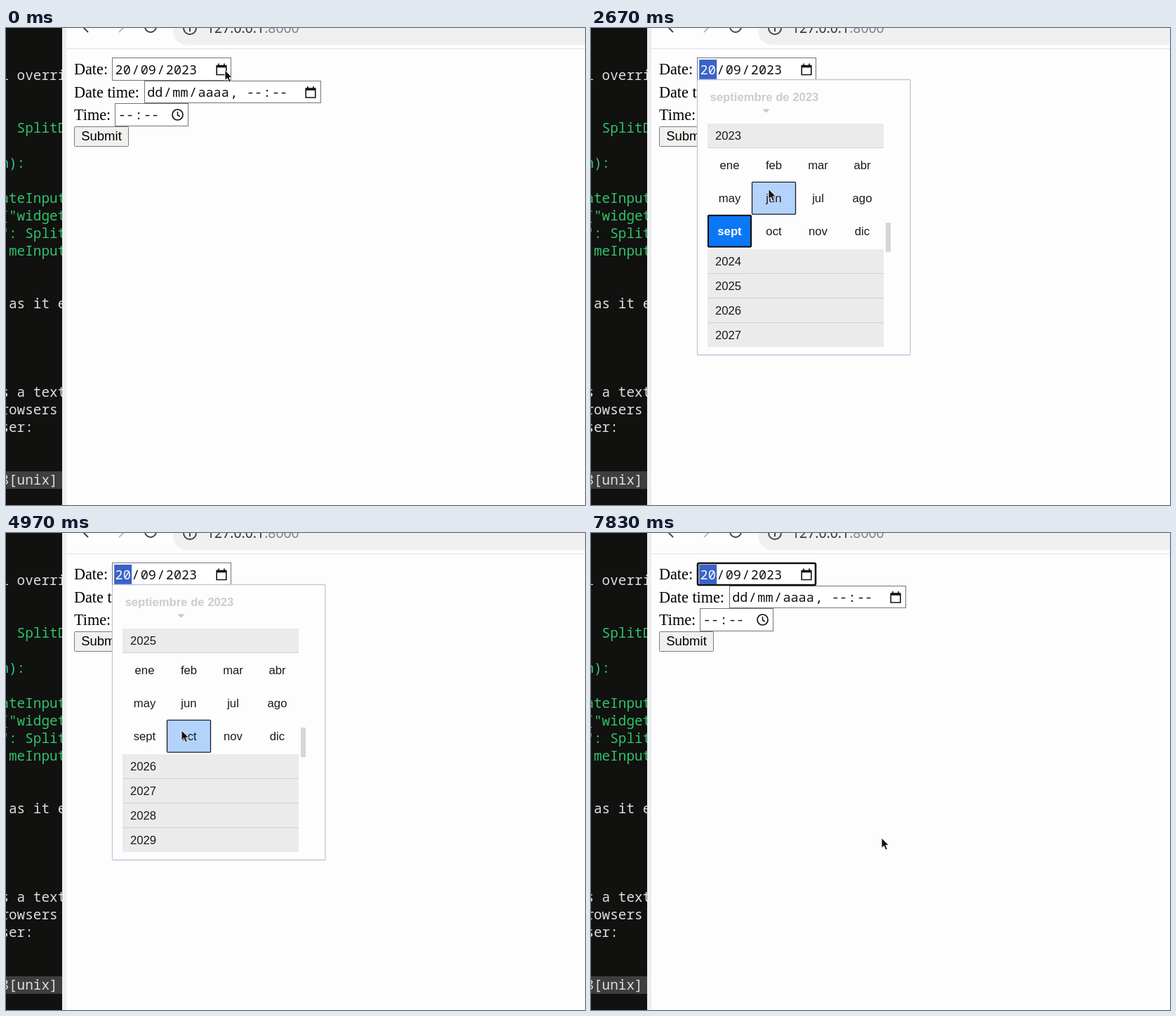
An HTML page that plays this animation: 825x679 px, repeating every 7860 ms.

```html
<!DOCTYPE html>
<html lang="es">
<head>
<meta charset="utf-8">
<title>Date picker</title>
<style>
html, body { margin: 0; width: 100%; height: 100%; overflow: hidden; background: #fdfdfd; }
svg { display: block; width: 825px; height: 679px; }
text { white-space: pre; }
.term { font: 19.35px "Noto Sans Mono", monospace; }
.field { font: 18.5px "Noto Sans Mono", monospace; fill: #111; }
.label { font: 22.2px "Liberation Serif", serif; fill: #000; }
.ui { font: 16.7px "Liberation Sans", sans-serif; fill: #1a1a1e; }
.mid { text-anchor: middle; }
.bold { font-weight: bold; }
</style>
</head>
<body>
<svg viewBox="0 0 825 679" xmlns="http://www.w3.org/2000/svg">
  <defs>
    <clipPath id="termClip"><rect width="80" height="679"/></clipPath>
    <clipPath id="listClip"><rect id="listArea" x="166" y="136" width="262" height="318"/></clipPath>
  </defs>
  <rect width="825" height="679" fill="#fdfdfd"/>
  <rect x="238" y="-22" width="700" height="46" rx="20" fill="#f0f0f3"/>
  <g fill="none" stroke="#444" stroke-width="2">
    <path d="M108-3L117 6"/>
    <path d="M161 6L170-3" stroke="#bbb"/>
    <path d="M198-2A8 8 0 0 0 214-2"/>
    <circle cx="262" cy="0" r="9"/>
    <path d="M262-2V5"/>
  </g>
  <text x="286" y="7" fill="#33333a" font-size="19.4" font-family="Noto Sans, sans-serif">127.0.0.1<tspan fill="#808088">:8000</tspan></text>
  <path d="M86 29.5H825" stroke="#e0e0ec"/>
  <rect x="80" width="6" height="679" fill="#ededf3"/>
  <rect width="80" height="679" fill="#111110"/>
  <g id="term" class="term" clip-path="url(#termClip)"></g>
  <g id="form"></g>
  <g id="popup"></g>
  <path id="cursor" d="M0 0V14.5L3.4 11.5L5.8 17.2L8.4 16.1L6 10.6H10.4Z" fill="#111" stroke="#fff" stroke-width=".9"/>
</svg>
<script>
const LOOP = 7860;
const OPEN = 480, CHOOSE = 1330, NEXT_A = 3300, NEXT_B = 4183, PICK = 5500, CLOSE = 7250;
const ROW = 35, MONTHS_H = 144.3, TOP = 136, CELL = 39.2;
const MONTHS = "ene feb mar abr may jun jul ago sept oct nov dic".split(" ");

// time, x, y
const PATH = [
  [0, 312, 60], [30, 312, 60], [230, 308, 57], [520, 308, 57], [1130, 298, 93], [1230, 292, 96],
  [1600, 292, 96], [1970, 258, 180], [2100, 258, 180], [2270, 256, 195], [2430, 256, 195],
  [2670, 253, 229], [3200, 243, 331], [3800, 243, 331], [4000, 242, 328], [4830, 242, 328],
  [4970, 250, 281], [5330, 251, 189], [5850, 251, 189], [6270, 336, 318], [6730, 414, 434], [LOOP, 414, 434]
];

const $ = id => document.getElementById(id);
const text = (s, x, y, cls, more = "") => `<text x="${x}" y="${y}" class="${cls}" ${more}>${s}</text>`;
const rect = (x, y, w, h, fill, more = "") => `<rect x="${x}" y="${y}" width="${w}" height="${h}" fill="${fill}" ${more}/>`;
const ramp = (t, start, length) => {
  const u = Math.min(1, Math.max(0, (t - start) / length));
  return u * u * (3 - 2 * u);
};

function cursorAt(t) {
  const i = Math.max(1, PATH.findIndex(k => k[0] > t));
  const a = PATH[i - 1], b = PATH[i];
  const u = (t - a[0]) / (b[0] - a[0]);
  return [a[1] + (b[1] - a[1]) * u, a[2] + (b[2] - a[2]) * u];
}

function terminal() {
  const W = "#dedede", G = "#30c268";
  const lines = [
    [74, "l overri", W], [149, "  SplitD", G], [199, "n):", "#34c48c"], [249, "ateInput", G],
    [274, "[\"widget", G], [299, "\": Split", G], [324, " meInput", G], [399, " as it e", W],
    [525, "s a text", W], [550, "rowsers", W], [575, "ser:", W], [650, "8[unix]", W]
  ];
  return rect(0, 631, 80, 25, "#3e3e3e") +
    lines.map(([y, s, c]) => text(s, -7.6, y, "", `fill="${c}"`)).join("");
}

// Editable parts carry a small padding on both sides; separators do not.
function fields(parts, x, y, selected) {
  const CH = 11.1, PAD = 1.4;
  return parts.map((s, i) => {
    const sep = i % 2, lit = selected && i === 0, w = s.length * CH + (sep ? 0 : 2 * PAD);
    const out = (lit ? rect(x, 45, w, 28, "#3a63c8") : "") +
      text(s, x + (sep ? 0 : PAD), y, "field", lit ? 'style="fill:#fff"' : "");
    x += w;
    return out;
  }).join("");
}

const calIcon = (x, y) =>
  `<path d="M${x - 6.8} ${y - 5.5}h13.600v13h-13.600zM${x - 4} ${y - 8.500}v3M${x + 4} ${y - 8.500}v3" fill="none" stroke="#111" stroke-width="1.6"/>` +
  rect(x - 6.8, y - 5.5, 13.6, 2.8, "#111");

function form(date, active, ring) {
  const box = (x, y, w, h) => rect(x, y, w, h, "#fff", 'stroke="#73737e"');
  const frame = ring
    ? rect(152, 43, 168, 31, "#fff", 'rx="2" stroke="#101010" stroke-width="2.6"')
    : box(151.5, 42.5, 169, 32);
  return text("Date:", 97, 66, "label") + text("Date time:", 97, 98.5, "label") + text("Time:", 97, 130.5, "label") +
    box(197.5, 75.5, 251, 31) + box(155.5, 107.5, 104, 32) + frame +
    fields(date, 154.2, 65.6, active) +
    fields(["dd", "/", "mm", "/", "aaaa", ", ", "--", ":", "--"], 199.8, 98.3) +
    fields(["--", ":", "--"], 158.4, 130.3) +
    calIcon(307, 59) + calIcon(434, 91.5) +
    '<circle cx="244.5" cy="123.5" r="7.5" fill="none" stroke="#111" stroke-width="1.7"/>' +
    '<path d="M244.5 119V124L248 126" fill="none" stroke="#111" stroke-width="1.5"/>' +
    rect(97.5, 140.5, 77, 28, "#f0f0ee", 'rx="1" stroke="#7a7a84"') +
    text("Submit", 136, 160, "ui mid", 'style="font-size:18.5px;fill:#000"');
}

function cell(x, y, w, h, on, hover) {
  if (on) return rect(x + 1, y + 1, w - 2, h - 2, "#0b76f6", 'rx="1" stroke="#0a0a0a" stroke-width="2"');
  return hover ? rect(x + .5, y + .5, w - 1, h - 1, "#b4d3fb", 'rx="1" stroke="#14202c" stroke-width="1.3"') : "";
}
const inside = (x, y, w, h, [px, py]) => px >= x && px < x + w && py >= y && py < y + h;

function days(year, month, pos) {
  const first = new Date(year, month, 1);
  const lead = (first.getDay() + 6) % 7;
  let out = "";
  for (let c = 0; c < 7; c++) out += text("LMXJVSD"[c], 185.5 + c * CELL, 162, "ui mid");
  for (let i = 0; i < 42; i++) {
    const d = new Date(year, month, 1 - lead + i);
    const cx = 185.5 + (i % 7) * CELL, cy = 197 + Math.floor(i / 7) * CELL;
    const same = d.getMonth() === month, on = same && d.getDate() === 20;
    const box = [cx - 19.5, cy - 20, 39, 39.2];
    const fill = on ? "#fff" : same ? "#1a1a1e" : "#7d7d82";
    out += cell(...box, on, inside(...box, pos)) +
      text(d.getDate(), cx, cy + 6, on ? "ui mid bold" : "ui mid", `style="fill:${fill}"`);
  }
  return out +
    '<path d="M376 118V96M366 106.5L376 96L386 106.5M420 95V117M410 106.5L420 117L430 106.5" fill="none" stroke="#333" stroke-width="1.7"/>' +
    text("Borrar", 181, 443, "ui", 'style="fill:#2580d2"') + text("Hoy", 395, 443, "ui", 'style="fill:#2580d2"');
}

function monthGrid(year, y, pos) {
  return MONTHS.map((m, i) => {
    const cx = 197.5 + (i % 4) * 63, cy = y + 59.3 + Math.floor(i / 4) * 46.9;
    const on = year === 2023 && i === 8;
    const box = [cx - 31.5, cy - 23.3, 63, 46.8];
    return cell(...box, on, inside(...box, pos)) +
      text(m, cx, Math.round(cy + 5.6), on ? "ui mid bold" : "ui mid", on ? 'style="fill:#fff"' : "");
  }).join("");
}

function yearList(step, pos) {
  const base = Math.floor(step), p = step - base;
  let y = TOP - ROW * p, out = "";
  for (let k = 0; k < 8; k++) {
    const year = 2023 + base + k, share = k === 0 ? 1 - p : k === 1 ? p : 0;
    const top = Math.floor(y);
    if (share) out += rect(166, top, 251, ROW + MONTHS_H * share, "#fdfdfd") + monthGrid(year, top, pos);
    // later rows cover whatever part of the grid is folded away
    out += rect(166, top, 251, ROW, "#ebebeb") +
      `<path d="M166 ${top + ROW - .5}H417" stroke="#d0d0d6"/>` + text(year, 177, top + 23, "ui");
    y += ROW + MONTHS_H * share;
  }
  return '<g clip-path="url(#listClip)">' + out + "</g>" + rect(420, 277, 7, 42, "#d6d6d6");
}

function popup(t, pos) {
  const late = t >= PICK;
  const dim = late ? 1 - ramp(t, PICK, 180) : ramp(t, CHOOSE, 200);
  const shade = `opacity="${1 - .79 * dim}"`;
  const head = late
    ? text("febrero de 2025", 166, 110, "ui bold", shade) + `<path d="M295 102H305.500L300.250 107.500Z" ${shade}/>`
    : text("septiembre de 2023", 169.5, 104, "ui bold", shade) + `<path d="M244.500 115.500H254.500L249.500 120.800Z" ${shade}/>`;
  let body;
  if (t < CHOOSE || late) body = days(late ? 2025 : 2023, late ? 1 : 8, pos);
  else {
    $("listArea").setAttribute("height", 318 * ramp(t, CHOOSE, 200));
    body = yearList(ramp(t, NEXT_A, 300) + ramp(t, NEXT_B, 300), pos);
  }
  return rect(151.5, 73.5, 303.5, 392, "#fdfdfd", 'rx="1" stroke="#c3c3dc" stroke-width="1.3"') + head + body;
}

const shown = {};
function put(id, html) {
  if (shown[id] !== html) $(id).innerHTML = shown[id] = html;
}

function draw(t) {
  const pos = cursorAt(t), open = t >= OPEN && t < CLOSE;
  const date = t >= PICK && open ? ["20", "/", "02", "/", "2025"] : ["20", "/", "09", "/", "2023"];
  put("form", form(date, t >= OPEN, t >= CLOSE));
  put("popup", open ? popup(t, pos) : "");
  $("cursor").setAttribute("transform", `translate(${pos})`);
}

put("term", terminal());
const start = performance.now();
function tick() {
  draw((performance.now() - start) % LOOP);
  requestAnimationFrame(tick);
}
tick();
</script>
</body>
</html>
```
